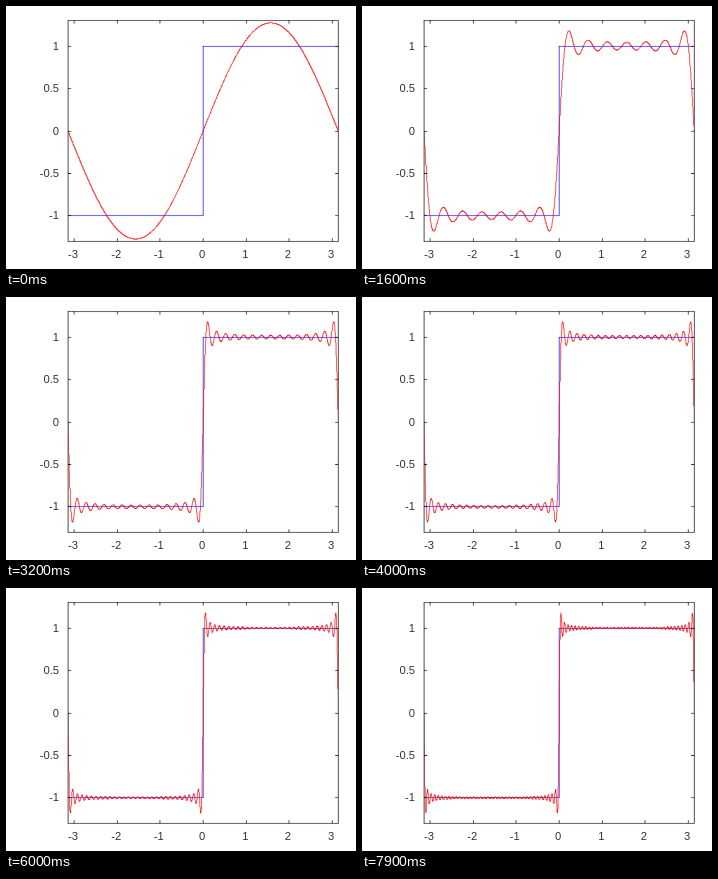
These frames come from a looping animation (350 by 263 pixels, 8 s). An HTML page:

```html
<!DOCTYPE html>
<html lang="en">
<head>
<meta charset="utf-8">
<title>Square wave partial sums</title>
<style>
  html, body { margin: 0; width: 100%; height: 100%; overflow: hidden; background: #fff; }
  svg { display: block; width: 100%; height: 100%; }
  path { stroke-width: 0.2; }
  text { font: 20.5px "Liberation Sans", Arial, sans-serif; fill: #333; }
</style>
</head>
<body>
<!-- Plotted on a 640 x 480 grid of unit cells, smoothed by scaling down. -->
<svg viewBox="0 0 640 480" preserveAspectRatio="none">
  <clipPath id="inside"><rect x="114" y="27" width="493" height="402"/></clipPath>
  <g clip-path="url(#inside)">
    <path id="square" fill="#00f" stroke="#00f"/>
    <path id="wave" fill="#f00" stroke="#f00"/>
  </g>
  <path id="axes" fill="#000" stroke="#000"/>
  <g id="labels"></g>
</svg>
<script>
const LOOP = 8000, HOLD = 500, STEP = 100;
const LEFT = 113, RIGHT = 607, TOP = 26, BOTTOM = 429;
const SAMPLES = 2000, TICK = 6;

const $ = id => document.getElementById(id);
const px = x => Math.round(360 + x * 247 / Math.PI);
const py = y => Math.round(227.5 - y * 154.9);
const box = (x, y, w, h) => `M${x} ${y}h${w}v${h}h${-w}z`;
const column = (x, a, b) => box(x, Math.min(a, b), 1, Math.abs(a - b) + 1);

function partialSum(x, count) {
  let sum = 0;
  for (let k = 1; k <= count; k += 2) sum += Math.sin(k * x) / k;
  return 4 / Math.PI * sum;
}

// One vertical run of cells per grid column.
function wavePath(count) {
  let d = "", x = LEFT, from = py(0), low = from, high = from;
  for (let i = 1; i <= SAMPLES; i++) {
    const t = (2 * i / SAMPLES - 1) * Math.PI;
    const nextX = px(t), y = py(partialSum(t, count));
    if (nextX !== x) {
      const mid = Math.round((from + y) / 2);
      d += column(x, Math.min(low, mid), Math.max(high, mid));
      const start = mid + Math.sign(y - mid);
      low = Math.min(start, y);
      high = Math.max(start, y);
      x = nextX;
    }
    low = Math.min(low, y);
    high = Math.max(high, y);
    from = y;
  }
  return d + column(x, low, high);
}

function label(x, y, anchor, value) {
  return `<text x="${x}" y="${y}" text-anchor="${anchor}">${value}</text>`;
}

function drawFrame() {
  const w = RIGHT - LEFT + 1, h = BOTTOM - TOP + 1;
  let d = box(LEFT, TOP, w, 1) + box(LEFT, BOTTOM, w, 1) +
          box(LEFT, TOP, 1, h) + box(RIGHT, TOP, 1, h);
  let text = "";
  for (let v = -3; v <= 3; v++) {
    const x = px(v);
    d += box(x, TOP, 1, TICK) + box(x, BOTTOM - TICK + 1, 1, TICK);
    text += label(x - 1.5, 460, "middle", v);
  }
  for (let v = -1; v <= 1; v += 0.5) {
    const y = py(v);
    d += box(LEFT, y, TICK, 1) + box(RIGHT - TICK + 1, y, TICK, 1);
    text += label(97, y + 7, "end", v);
  }
  $("axes").setAttribute("d", d);
  $("labels").innerHTML = text;

  const mid = px(0), high = py(1), low = py(-1);
  $("square").setAttribute("d",
    box(LEFT, low, mid - LEFT + 1, 1) + column(mid, high, low) +
    box(mid, high, RIGHT - mid + 1, 1));
}

let shown = 0;
function update(now) {
  const t = now % LOOP;
  const count = t < HOLD ? 1 : 2 + Math.floor((t - HOLD) / STEP);
  if (count !== shown) {
    $("wave").setAttribute("d", wavePath(count));
    shown = count;
  }
}

function tick() {
  update(performance.now());
  requestAnimationFrame(tick);
}

drawFrame();
tick();
</script>
</body>
</html>
```
